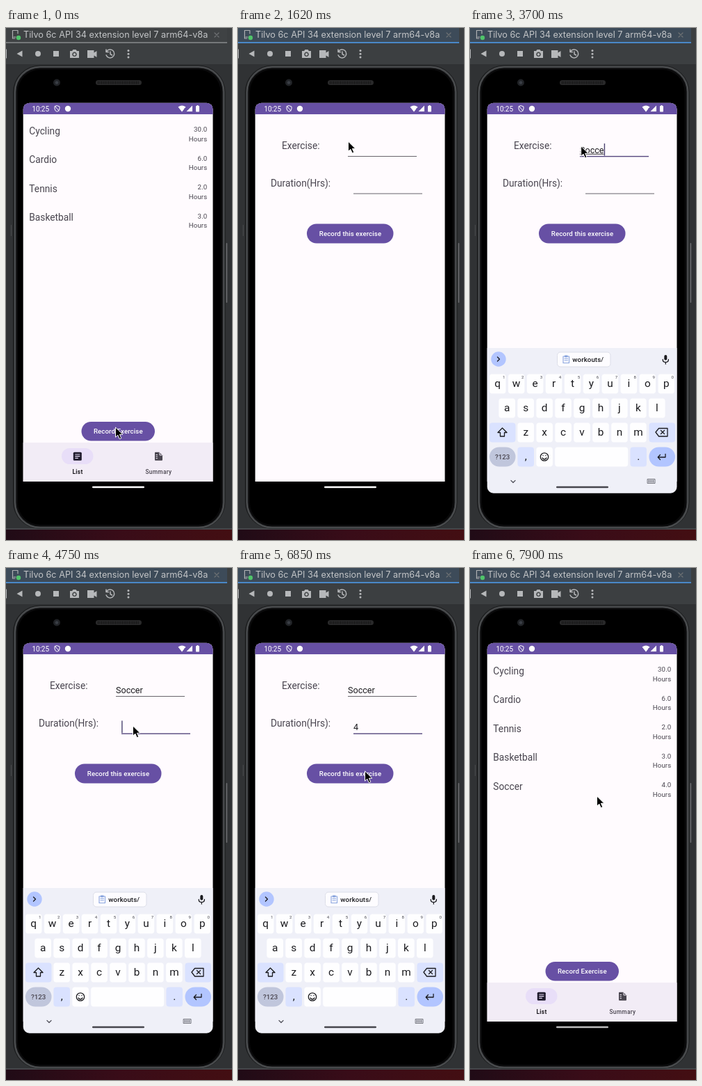
These frames come from a looping animation (325 px wide and 736 px high, 8000 ms). An HTML page:

```html
<!DOCTYPE html>
<html lang="en">
<head>
<meta charset="utf-8">
<title>Exercise log</title>
<style>
  html, body { margin: 0; width: 100%; height: 100%; overflow: hidden; background: #303234; }
  svg { display: block; width: 325px; height: 736px; font-family: Roboto, sans-serif; }
  .mid { text-anchor: middle; }
  .end { text-anchor: end; }
  .med { font-weight: 500; letter-spacing: .12px; }
  .line { fill: none; stroke-linecap: round; stroke-linejoin: round; }
  .title { font: 12.7px Inter, sans-serif; fill: #c3c5c7; }
  .item { font-size: 13.75px; fill: #49454f; }
  .small { font-size: 9.7px; fill: #49454f; letter-spacing: .08px; }
  .input { font-size: 12.6px; fill: #1c1b1f; }
  .nav { font-size: 8.3px; letter-spacing: .35px; font-weight: 500; }
  .key { font-size: 15.4px; fill: #1b1b1f; }
  .hint { font-size: 6.2px; fill: #45464f; }
</style>
</head>
<body>
<svg viewBox="0 0 325 736">
  <defs>
    <clipPath id="glass"><rect x="24.700" y="107.700" width="272.800" height="561" rx="9"/></clipPath>
    <clipPath id="fabClip"><rect x="108.500" y="566" width="105.500" height="27.500" rx="13.750"/></clipPath>
    <clipPath id="saveClip"><rect x="99" y="281.500" width="124.500" height="28" rx="14"/></clipPath>
    <linearGradient id="wall">
      <stop offset="0" stop-color="#200b16"/><stop offset=".5" stop-color="#390c18"/><stop offset="1" stop-color="#430e12"/>
    </linearGradient>
  </defs>

  <!-- tool window -->
  <rect width="325" height="52" fill="#3c3f41"/>
  <rect id="tab" width="318" height="20"/>
  <rect id="tabLine" y="20" width="318" height="2"/>
  <g class="line" stroke="#afb1b3" stroke-width="1.2">
    <path d="M17 8V3.500H9.500V15H13M11 13h3"/>
    <path d="M300 7l6 6m0-6l-6 6" stroke="#6f7274"/>
  </g>
  <circle cx="18" cy="14" r="3.200" fill="#4fc46a"/>
  <text class="title" x="25" y="14">Tilvo 6c API 34 extension level 7 arm64-v8a</text>
  <g fill="#b6b8ba">
    <path d="M0 30.500h1v13H0zM15.500 37l8-4.500v9zM68 33h8v8h-8z"/>
    <circle cx="46" cy="37" r="4"/>
    <path fill-rule="evenodd" d="M92 33h3l1.500-2h4l1.500 2h3v10H92zM98.500 34.500a3.300 3.300 0 1 0 .01 0z"/>
    <circle cx="98.500" cy="37.800" r="1.900"/>
    <path d="M117 32h9.500v3.500l4-2.500v9l-4-2.500V43H117z"/>
    <circle cx="176" cy="32.500" r="1.500"/><circle cx="176" cy="37.300" r="1.500"/><circle cx="176" cy="42" r="1.500"/>
  </g>
  <path class="line" stroke="#b6b8ba" stroke-width="1.500" d="M144.500 34a6 6 0 1 1-.4 5M144 31v3.500h3.500M150 34v3.500l2.500 1.500"/>

  <!-- phone -->
  <rect y="721" width="325" height="15" fill="url(#wall)"/>
  <rect y="719.500" width="325" height="1.200" fill="#55565a"/>
  <rect x="316.600" y="309" width="1.600" height="86" rx=".8" fill="#6a6c6e"/>
  <path d="M7.500 283v16" stroke="#4a4c4e"/>
  <rect x="10" y="53.500" width="305.500" height="666.500" rx="39" fill="#1b1c1d"/>
  <rect x="13" y="56" width="300" height="662" rx="36" fill="#0a0a0b" stroke="#3b3d3f" stroke-width="3"/>
  <rect x="12.700" y="55.700" width="300.600" height="662.600" rx="36.300" fill="none" stroke="#56585a"/>
  <rect x="17" y="60" width="291.500" height="654" rx="32" fill="#000"/>
  <circle cx="73" cy="78.500" r="5" fill="#212327"/><circle cx="73" cy="78.500" r="2.300" fill="#3a3e45"/>
  <rect x="129" y="75" width="66" height="7" rx="3.500" fill="#29292a"/>
  <path d="M132 78.500h60" stroke="#111" stroke-width="4" stroke-dasharray="1 1.500"/>

  <g clip-path="url(#glass)">
    <rect x="24" y="107" width="275" height="545" fill="#fffbfe"/>

    <g id="list">
      <g id="rows"></g>
      <rect x="108.500" y="566" width="105.500" height="27.500" rx="13.750" fill="#6750a4"/>
      <g clip-path="url(#fabClip)"><circle id="fabRipple" cx="158" cy="576" fill="#fff" opacity=".14"/></g>
      <text class="small med mid" x="161.300" y="583.400" style="fill:#fff">Record Exercise</text>
      <rect x="24" y="596" width="275" height="56" fill="#f2ecf6"/>
      <rect x="80" y="604" width="45.500" height="23" rx="11.500" fill="#e8def8"/>
      <rect x="96.800" y="609.800" width="12" height="12" rx="1.500" fill="#1d192b"/>
      <path d="M99.300 613h7m-7 2.700h7m-7 2.700h4.500" stroke="#e8def8" stroke-width="1.200"/>
      <path d="M215 609.800h5.500l4.500 4.500v6.500q0 1-1 1h-9q-1 0-1-1v-10q0-1 1-1z" fill="#49454f"/>
      <path d="M216 613.500h1.500m-1.500 2.500h1.500m-1.500 2.600h1.500M221 610.500v3.500h3.500" class="line" stroke="#f2ecf6"/>
      <text class="nav mid" x="103" y="640.500" style="font-weight:700" fill="#1d1b20">List</text>
      <text class="nav mid" x="219.500" y="640.500" fill="#49454f">Summary</text>
    </g>

    <g id="form">
      <text class="item" x="63" y="174">Exercise:</text>
      <text class="item" x="47" y="228">Duration(Hrs):</text>
      <rect id="rule0" x="158" width="99"/>
      <rect id="rule1" x="166" width="99"/>
      <text id="field0" class="input" x="158" y="179.500"></text>
      <text id="field1" class="input" x="166" y="233.300"></text>
      <rect id="compose" x="158" y="180.800" height=".9" fill="#1c1b1f"/>
      <rect id="caret" width="1.400" height="17.500" fill="#4b4270"/>
      <rect x="99" y="281.500" width="124.500" height="28" rx="14" fill="#6750a4"/>
      <g clip-path="url(#saveClip)"><circle id="saveRipple" cx="183" cy="295" fill="#fff" opacity=".14"/></g>
      <text class="small med mid" x="161.500" y="299.200" style="fill:#fff">Record this exercise</text>
    </g>

    <!-- status bar -->
    <rect x="24" y="107" width="275" height="17" fill="#6750a4"/>
    <g fill="#fff">
      <text x="37.500" y="119.800" font-size="10" letter-spacing="-.1">10:25</text>
      <circle cx="89" cy="116" r="4.200"/>
      <path d="M247.500 113.500q5.500-4 11 0l-5.500 7zM268 111.500v8.500h-8.500z"/>
      <rect x="273" y="112" width="5" height="8.500" rx=".8"/><rect x="274.500" y="111" width="2" height="2"/>
    </g>
    <path class="line" stroke="#fff" d="M73.500 111.700l3.500 1.300v3q0 3-3.500 4.300q-3.500-1.300-3.500-4.300v-3zM71 113l5 6"/>
    <path d="M257 115.500v5" stroke="#6750a4" stroke-width="1.500"/>

    <g id="board">
      <rect x="24" y="460" width="275" height="209" fill="#eff0f8"/>
      <circle cx="41" cy="476" r="10.700" fill="#b2c5ff"/>
      <g id="chip">
        <rect x="125.500" y="466" width="76.500" height="21" rx="4.500" fill="#fdfcff" stroke="#dcdee8"/>
        <path class="line" stroke="#8aa5de" stroke-width="1.100" d="M134 472h8.500v9.500H134zM136.500 471h3.500v2h-3.500zM136 475.500h4.500m-4.500 2.500h4.500"/>
        <text class="small med" x="147.300" y="480" style="fill:#1b1b1f">workouts/</text>
      </g>
      <rect x="279.300" y="470" width="4" height="7.500" rx="2" fill="#1b1b1f"/>
      <g id="keys"></g>
      <g class="line" stroke="#1b1b1f" stroke-width="1.300">
        <path d="M39.500 473l3 3-3 3M277.200 476.500q0 4 4.100 4t4.100-4M281.300 480.500v2.500"/>
        <path d="M46.500 575l6.500 6.500h-3.500v5.500h-6v-5.500H40zM267 581l4.500-5.500H284v11.500h-12.500zM274.500 578.500l5 5m0-5l-5 5"/>
        <path d="M281 612.500v4.500h-10.500m3-3.500l-3.300 3.500 3.300 3.500"/>
        <circle cx="107" cy="616.500" r="5.700"/><path d="M104 618q3 4 6 0M105 614.500v.2M109 614.500v.2"/>
        <path d="M59 650.500l3 3 3-3" stroke="#55565f"/>
        <path d="M255.500 648.500h10.500v6h-10.500z" stroke="#55565f" stroke-width=".8"/>
        <path d="M257 650.500h8m-8 2h8" stroke="#55565f" stroke-dasharray=".4 1.800"/>
      </g>
    </g>
  </g>
  <rect id="handle" x="124" y="658.800" width="75" height="2.400" rx="1.200"/>

  <path id="mouse" d="M0 0V14.200L3.300 11.200L5.800 16.700L8.300 15.600L5.900 10.300H10.400z" fill="#000" stroke="#fff" stroke-width="1" stroke-linejoin="round"/>
</svg>
<script>
const $ = id => document.getElementById(id);
const set = (id, attrs) => { for (const k in attrs) $(id).setAttribute(k, attrs[k]); };
const show = (id, on) => set(id, { visibility: on ? 'visible' : 'hidden' });
const clamp = v => Math.max(0, Math.min(1, v));
const text = (cls, x, y, s) => `<text class="${cls}" x="${x}" y="${y}">${s}</text>`;

// exercise rows
const sports = [['Cycling', 30], ['Cardio', 6], ['Tennis', 2], ['Basketball', 3], ['Soccer', 4]];
$('rows').innerHTML = sports.map(([name, hours], i) => {
  const y = 153 + 41.4 * i;
  return `<g id="row${i}">` + text('item', 33.3, y, name) +
    text('small end', 289.3, y - 3.7, hours.toFixed(1)) + text('small end', 289.3, y + 10, 'Hours') + '</g>';
}).join('');

// keyboard
const cap = (x, row, w, fill = '#fefeff', rx = 4) =>
  `<rect x="${x}" y="${497.5 + 35 * row}" width="${w}" height="28" rx="${rx}" fill="${fill}"/>`;
let keys = '';
['qwertyuiop', 'asdfghjkl', 'zxcvbnm'].forEach((letters, row) => {
  [...letters].forEach((c, i) => {
    const x = [39.7, 53.2, 80.2][row] + 26.95 * i;
    keys += cap(x - 11.8, row, 23.6) + text('key mid', x, 516.3 + 35 * row, c);
    if (!row) keys += text('hint mid', x + 9, 504.3, (i + 1) % 10);
  });
});
keys += cap(28, 2, 37.5, '#dae2ff') + cap(257.5, 2, 37.5, '#dae2ff')
  + cap(28, 3, 37.5, '#c0c6dc', 14) + cap(68.4, 3, 23.6, '#dae2ff') + cap(95.3, 3, 23.6)
  + cap(122.2, 3, 105) + cap(230.4, 3, 23.6, '#dae2ff') + cap(257.5, 3, 37.5, '#b2c5ff', 14)
  + text('small med mid', 46.7, 620, '?123')
  + text('key mid', 80.2, 621, ',') + text('key mid', 242.2, 621, '.');
$('keys').innerHTML = keys;

const LOOP = 8000, TICK = 149.3;
// time, x, y
const path = [[570, 157.5, 574], [870, 148.6, 131], [1020, 148.6, 107], [1770, 159.7, 170],
  [4300, 159.7, 170], [4750, 182.5, 227], [6200, 182.5, 227], [6850, 182.5, 292], [7300, 182.5, 292], [7880, 182.5, 328]];
// time, focused field, its text, time the caret has already blinked
const edits = [[2060, 0, '', 210], [3260, 0, 'S'], [3400, 0, 'So'], [3550, 0, 'Socc'], [3700, 0, 'Socce'],
  [3850, 0, 'Soccer'], [4740, 1, ''], [5200, 1, '3'], [5800, 1, ''], [5950, 1, '4']];

function mouseAt(t) {
  const i = path.findIndex(p => p[0] > t);
  if (i < 0) return path[path.length - 1].slice(1);
  if (!i) return path[0].slice(1);
  const [a, b] = [path[i - 1], path[i]];
  let k = (t - a[0]) / (b[0] - a[0]);
  k = k * k * (3 - 2 * k);
  return [a[1] + (b[1] - a[1]) * k, a[2] + (b[2] - a[2]) * k];
}

function ripple(id, t, start, end) {
  const on = t >= start && t < end;
  show(id, on);
  if (on) set(id, { r: 25 + 90 * clamp((t - start) / 300) });
}

function drawForm(t) {
  const edit = edits.filter(e => e[0] <= t).pop() || [0, -1, ''];
  const [since, focus, value, lead = 0] = edit;
  $('field0').textContent = focus === 0 ? value : focus === 1 ? 'Soccer' : '';
  $('field1').textContent = focus === 1 ? value : '';
  [184, 237.6].forEach((y, i) => set('rule' + i, i === focus
    ? { y: y - .1, height: 1.4, fill: '#56487f' } : { y, height: 1, fill: '#68656c' }));
  const width = focus < 0 ? 0 : $('field' + focus).getComputedTextLength();
  set('compose', { width: focus === 0 ? width : 0 });
  set('caret', { x: (focus ? 166.2 : 158.2) + width, y: focus ? 219.5 : 166 });
  $('caret').style.opacity = focus >= 0 && Math.floor((t - since + lead) / 500) % 2 === 0 ? 1 : 0;
}

function draw(t) {
  const q = 720 + TICK * Math.floor((t - 715) / TICK);
  const active = t >= 150, inForm = t >= 720 && t < 7440;
  set('tab', { fill: active ? '#3d4b59' : '#3f4244' });
  set('tabLine', { fill: active ? '#4a88c7' : '#75787a' });

  $('list').style.display = inForm ? 'none' : '';
  $('form').style.display = inForm ? '' : 'none';
  show('row4', t >= 7440);
  ripple('fabRipple', t, 150, 420);
  ripple('saveRipple', t, 6990, 7290);
  if (inForm) {
    set('form', { transform: `translate(${13 * Math.exp((720 - q) / 80)})` });
    drawForm(t);
  }

  const rise = clamp((q - 2250) / 400), fall = clamp((q - 7200) / 350);
  const up = rise > 0 && fall < 1;
  $('board').style.display = up ? '' : 'none';
  if (up) {
    set('board', {
      transform: `translate(0 ${209 * ((1 - rise) ** 2.65 + fall * fall)})`,
      opacity: Math.min(1, rise * 1.8) * (1 - fall)
    });
    const s = Math.min(1, rise * 2);
    set('chip', { transform: `translate(163.7 476.5) scale(${s}) translate(-163.7 -476.5)`, opacity: s });
  }
  set('handle', { fill: t < 3260 ? '#fff' : t < 7440 ? '#46464d' : '#bdbdbd' });

  set('mouse', { transform: `translate(${mouseAt(q).join(' ')})` });
}

let start;
function frame(now) {
  start ??= now;
  draw((now - start) % LOOP);
  requestAnimationFrame(frame);
}
draw(0);
requestAnimationFrame(frame);
</script>
</body>
</html>
```
